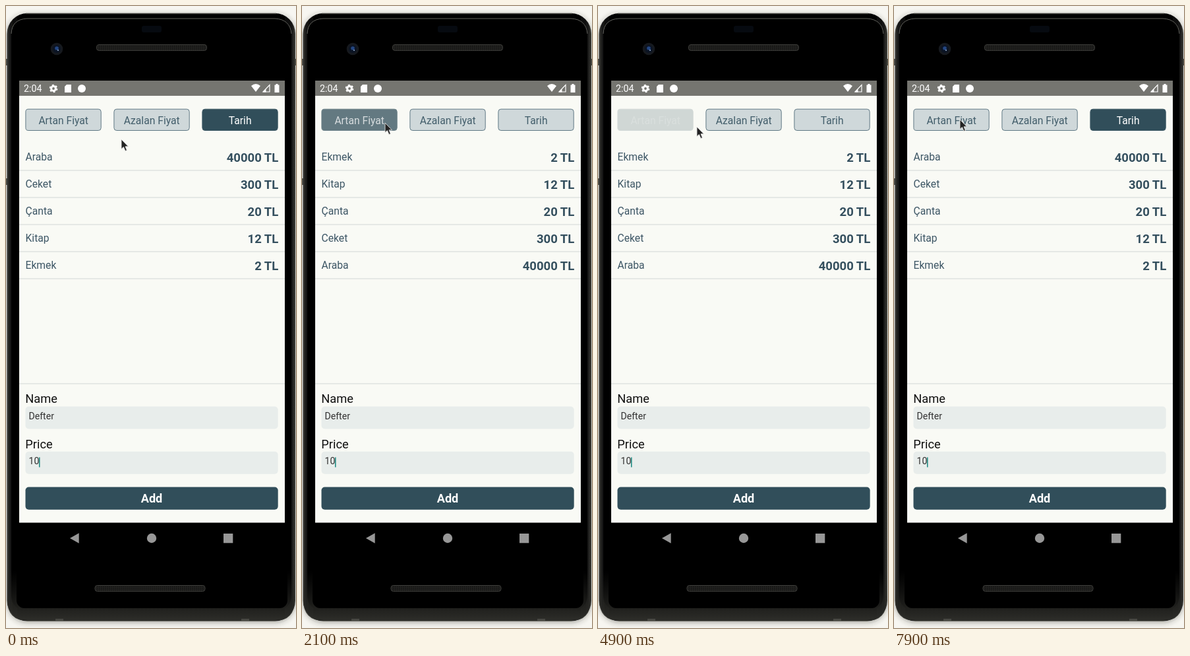
These frames come from a looping animation (440 by 942 pixels, 8 s). An HTML page:

```html
<!DOCTYPE html>
<html lang="tr">
<head>
<meta charset="utf-8">
<title>Price list</title>
<style>
  html, body { margin: 0; width: 100%; height: 100%; overflow: hidden; background: #f7f6f1; }
  svg { display: block; width: 440px; height: 942px; font-family: Roboto, sans-serif; }
  .tab rect { fill: #cfd8da; stroke: #607985; }
  .tab text { font-size: 15.7px; fill: #435e6b; text-anchor: middle; }
  .tab.on rect { fill: #314e5a; stroke: #3b5763; }
  .tab.on text { fill: #fff; }
  .item { font-size: 15.7px; fill: #3d5665; }
  .cost { font-size: 18.5px; font-weight: 700; fill: #344f5e; text-anchor: end; }
  .line { stroke: #dfe2e0; stroke-width: 1.6; }
  .label { font-size: 18.3px; fill: #111; }
  .field { fill: #e8edeb; }
  .value { font-size: 14.1px; fill: #333; }
</style>
</head>
<body>
<svg viewBox="0 0 440 942">
  <defs>
    <linearGradient id="rim" x2="1" y2="0">
      <stop offset="0" stop-color="#3a3a36"/>
      <stop offset=".012" stop-color="#161615"/>
      <stop offset=".04" stop-color="#040404"/>
      <stop offset=".96" stop-color="#040404"/>
      <stop offset=".988" stop-color="#161615"/>
      <stop offset="1" stop-color="#3a3a36"/>
    </linearGradient>
    <linearGradient id="chin" x2="0" y2="1">
      <stop offset="0" stop-color="#20201d" stop-opacity="0"/>
      <stop offset="1" stop-color="#2e2e2a"/>
    </linearGradient>
    <pattern id="mesh" width="3" height="3" patternUnits="userSpaceOnUse">
      <rect width="3" height="3" fill="#222220"/>
      <rect width="1.5" height="1.5" fill="#0e0e0d"/>
    </pattern>
    <filter id="shadow" x="-10%" y="-10%" width="120%" height="120%">
      <feDropShadow dx="0" dy="2" stdDeviation="4" flood-color="#33332f" flood-opacity=".45"/>
    </filter>
  </defs>

  <!-- phone -->
  <g fill="#55554f">
    <rect y="80" width="4" height="10"/>
    <rect y="261" width="4" height="10"/>
    <rect x="437" y="80" width="3" height="10"/>
  </g>
  <rect x="1.5" y="11" width="437.5" height="920.5" rx="31" fill="url(#rim)" filter="url(#shadow)"/>
  <rect x="8" y="19" width="425" height="897" rx="22"/>
  <path d="M2 855H438V900Q438 931 408 931H33Q2 931 2 900Z" fill="url(#chin)"/>
  <rect x="16" y="782" width="411" height="130" rx="12"/>
  <path d="M8 42Q9 20 32 19H408Q431 20 433 42" fill="none" stroke="#62625d"/>
  <path d="M30 11.500H410" stroke="#4a4a45" stroke-width="1.500"/>
  <g fill="#484843">
    <rect x="75" y="928" width="12" height="3"/>
    <rect x="357" y="928" width="12" height="3"/>
  </g>
  <rect x="206" y="30" width="30" height="10" rx="3" fill="#060a10"/>
  <circle cx="77" cy="65" r="9.300" fill="#16191e"/>
  <circle cx="77" cy="65" r="6" fill="#0b1424"/>
  <circle cx="77" cy="64" r="2.800" fill="#244682"/>
  <circle cx="79" cy="67" r="1.100" fill="#8fa6c4"/>
  <g fill="url(#mesh)" stroke="#3c3c39">
    <rect x="137.500" y="58.500" width="167" height="9" rx="3.500"/>
    <rect x="135" y="877.500" width="167" height="9" rx="3.500"/>
  </g>

  <!-- screen -->
  <rect x="20" y="113" width="403" height="669.500" fill="#f9faf5"/>
  <rect x="20" y="113" width="403" height="23" fill="#757570"/>
  <g fill="#fff">
    <text x="27" y="130" font-size="14.200">2:04</text>
    <circle cx="72" cy="125" r="3.400" fill="none" stroke="#fff" stroke-width="3"/>
    <circle cx="72" cy="125" r="5.400" fill="none" stroke="#fff" stroke-width="1.800" stroke-dasharray="2.83 2.83"/>
    <path d="M92 119H99V131H89V122Z"/>
    <circle cx="115" cy="125" r="6"/>
    <path d="M372 121Q379 115 386 121L379 130Z"/>
    <path d="M390 130H400V119.500Z" fill="none" stroke="#fff" stroke-width="1.200"/>
    <path d="M394.500 126V130.500H390Z"/>
    <path d="M409.500 118H412.500V119.500H414.500V131H407.500V119.500H409.500Z"/>
  </g>
  <g id="tabs"></g>
  <g id="list"></g>
  <path class="line" d="M20 572H423"/>
  <text class="label" x="29.300" y="601">Name</text>
  <rect class="field" x="29.500" y="606.500" width="383.200" height="34" rx="5"/>
  <text class="value" x="34.500" y="626">Defter</text>
  <text class="label" x="29.300" y="669.500">Price</text>
  <rect class="field" x="29.500" y="674.700" width="383.200" height="34" rx="5"/>
  <text class="value" x="34.500" y="694.300">10</text>
  <rect id="caret" x="50" y="683.500" width="1.500" height="15" fill="#16877f"/>
  <rect x="29.500" y="728.500" width="383.200" height="34.200" rx="5" fill="#314e5a"/>
  <text x="221" y="752" font-size="18.100" font-weight="700" fill="#fff" text-anchor="middle">Add</text>

  <g fill="#979797">
    <path d="M97 806L110.700 798.300V813.700Z"/>
    <circle cx="221" cy="806" r="7.200"/>
    <rect x="330" y="799" width="14.300" height="14.300"/>
  </g>
  <path id="cursor" d="M0 0V14.500L3.400 11.500L6 17.500L8.400 16.500L6 10.800H10.500Z" fill="#222" stroke="#e4e4e2" stroke-width=".9"/>
</svg>
<script>
  const LOOP = 8000, STEP = 100;
  const ASC = 0, DESC = 1, DATE = 2;
  const $ = id => document.getElementById(id);
  const clamp = p => Math.min(1, Math.max(0, p));
  const ease = p => p < .5 ? 2 * p * p : 1 - 2 * (1 - p) ** 2;

  const goods = [['Araba', 40000], ['Ceket', 300], ['Çanta', 20], ['Kitap', 12], ['Ekmek', 2]];
  // tab, finger down, selection, start of fade back
  const taps = [
    [DESC, 400, 700, 650],
    [ASC, 1600, 1900, 1950],
    [DESC, 2650, 2900, 2950],
    [DATE, 3600, 3800, 3850],
    [ASC, 4550, 4900, 4950],
    [DATE, 5300, 5600, 5650]
  ];
  // time, x, y of the pointer tip
  const path = [
    [0, 175, 202], [500, 190, 174], [900, 190, 174], [1500, 42, 172], [1800, 42, 172],
    [2100, 126, 177], [2400, 205, 177], [2900, 205, 177], [3500, 321, 169], [4000, 321, 169],
    [4500, 127, 173], [4700, 129, 174], [4800, 129, 174], [4900, 150, 183], [5200, 330, 174],
    [5700, 330, 174], [6200, 292, 565], [6300, 268, 612], [6900, 178, 745], [7100, 178, 745],
    [7900, 100, 172]
  ];

  $('tabs').innerHTML = ['Artan Fiyat', 'Azalan Fiyat', 'Tarih'].map((name, i) => {
    const x = 29.9 + i * 134;
    return `<g class="tab"><rect x="${x}" y="156.2" width="114.3" height="32.3" rx="4"/>
      <text x="${x + 57.3}" y="179">${name}</text></g>`;
  }).join('');
  const tabs = [...document.querySelectorAll('.tab')];

  $('list').innerHTML = goods.map((_, i) => {
    const y = 233.5 + i * 41;
    return `<text class="item" x="29.5" y="${y}"></text>
      <text class="cost" x="413.3" y="${y + 2.5}"></text>
      <path class="line" d="M20 ${y + 15.5}H423"/>`;
  }).join('');
  const items = document.querySelectorAll('.item');
  const costs = document.querySelectorAll('.cost');

  function pointer(t) {
    const i = path.findIndex(k => k[0] > t);
    if (i < 0) return path.at(-1).slice(1);
    const [t0, x0, y0] = path[i - 1], [t1, x1, y1] = path[i];
    const p = (t - t0) / (t1 - t0);
    return [x0 + (x1 - x0) * p, y0 + (y1 - y0) * p];
  }

  function draw(t) {
    let selected = DATE;
    const alpha = [1, 1, 1];
    for (const [tab, down, pick, rise] of taps) {
      if (t < down) break;
      if (t >= pick) selected = tab;
      alpha[tab] = t < pick
        ? 1 - .8 * ease(clamp((t - down) / 100))
        : .2 + .8 * ease(clamp((t - rise) / 250));
    }
    tabs.forEach((tab, i) => {
      tab.classList.toggle('on', i === selected);
      // box and label fade separately, so a dim label blends into its box
      for (const part of tab.children) part.setAttribute('opacity', alpha[i]);
    });
    goods.forEach((_, i) => {
      const [name, price] = goods[selected === ASC ? goods.length - 1 - i : i];
      items[i].textContent = name;
      costs[i].textContent = price + ' TL';
    });
    $('caret').setAttribute('opacity', (t + 100) % 1000 < 500 ? 1 : 0);
    $('cursor').setAttribute('transform', `translate(${pointer(t)})`);
  }

  const start = performance.now();
  function tick() {
    const t = (performance.now() - start) % LOOP;
    draw(Math.floor(t / STEP) * STEP);
    requestAnimationFrame(tick);
  }
  tick();
</script>
</body>
</html>
```
